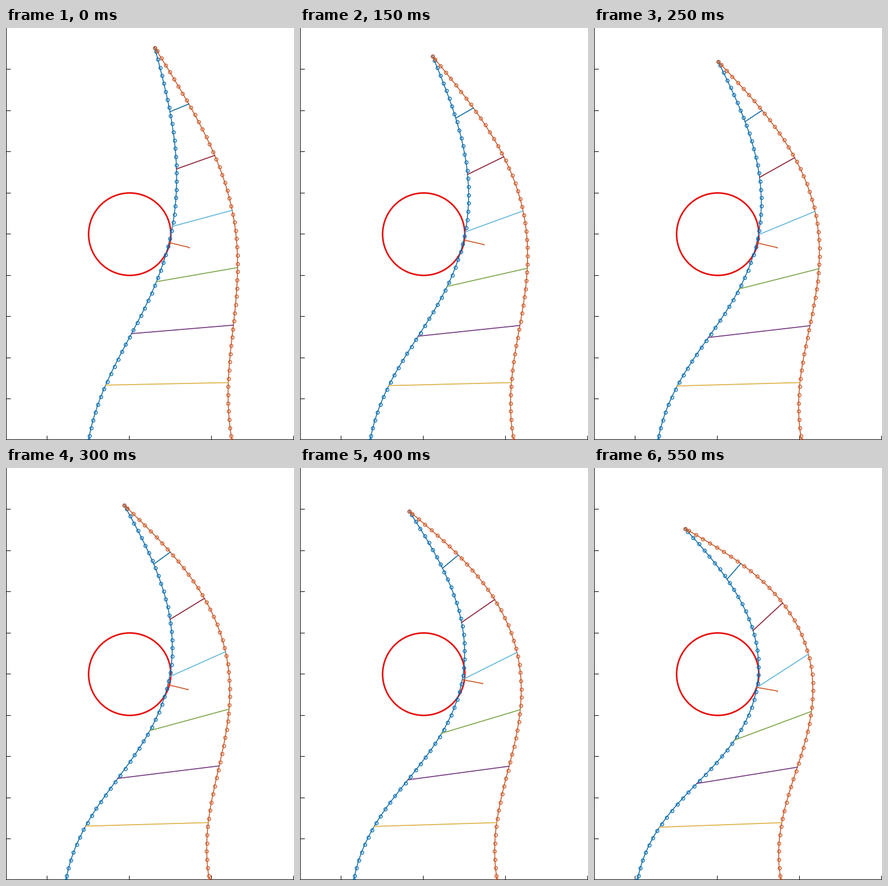
A matplotlib script that plays this animation: 480 px wide and 685 px high, repeating every 0.6 s.

```python
import numpy as np
import matplotlib.pyplot as plt
from matplotlib.animation import FuncAnimation
from matplotlib.colors import to_rgb
from matplotlib.patches import Circle

W, H, DPI = 480, 685, 80
PX = 72 / DPI                 # one pixel in points
UNIT = 68.5                   # pixels per axis unit
FLOOR = 684.6
FRAMES = 12
SEGMENTS, SEG = 50, 0.2 * UNIT
GAP = 238.9                   # distance between the two feet
FOOT_LEAN = 10                # degrees, mirrored on the two sides
RUNG_NODES = range(7, 43, 7)

# Bending of each side as amplitudes (degrees) of the cantilever modes
# sin((k - 1/2) pi s): at rest, and what a full load adds
LEFT = np.array([[-7.9, 19.4, 3.2, 0.6], [-10.6, 19.9, 1.9, -1.3]])
RIGHT = np.array([[-8.5, 17.4, 3.8, -0.2], [-12.7, 16.7, 1.3, 0.0]])

S = (np.arange(SEGMENTS) + 0.5) / SEGMENTS
MODES = np.sin(np.outer(np.arange(4) + 0.5, np.pi * S))


def mute(color, amount=0.25):
    """Pull a colour towards the grey of its own brightness."""
    rgb = np.array(to_rgb(color))
    grey = rgb @ [0.299, 0.587, 0.114]
    return tuple(rgb + (grey - rgb) * amount)


BLUE, ORANGE = mute("#0072BD", 0.15), mute("#D95319", 0.15)
RUNG_COLORS = [mute(c) for c in ("#EDB120", "#7E2F8E", "#77AC30",
                                 "#4DBEEE", "#A2142F", "#0072BD")]


def feed(i):
    """Whole steps the feet have moved; the pace is slightly uneven."""
    return int(np.interp(i, [0, 2, 3, 7, 10, 11], [0, 3, 6, 13, 17, 19]))


def beam(shape, load, x, foot):
    rest, added = shape
    bulge = 2 * load * (1 - load) * np.sin(np.pi * S)
    ang = np.radians(foot + (rest + load * added) @ MODES + bulge)
    steps = SEG * np.column_stack([np.sin(ang), -np.cos(ang)])
    nodes = np.vstack([[0, 0], np.cumsum(steps, axis=0)]) + [x, FLOOR]
    return nodes, ang


def pose(i):
    step = feed(i)
    load = 0.046 * step + 0.126 * (step / 19) ** 12   # slips at the end
    x = 2 * UNIT - 0.05 * UNIT * step
    left, ang = beam(LEFT, load, x, FOOT_LEAN)
    right, _ = beam(RIGHT, load, x + GAP, -FOOT_LEAN)
    # close the fingertip
    right += np.outer(np.linspace(0, 1, SEGMENTS + 1), left[-1] - right[-1])
    touch = 26 + (step + 1) // 7
    tilt = (ang[touch - 1] + ang[touch]) / 2
    start = left[touch]
    end = start + 0.5 * UNIT * np.array([np.cos(tilt), np.sin(tilt)])
    return left, right, start, end


def markers(nodes):
    """Both ends plus the middle of every segment."""
    return np.vstack([nodes[:1], (nodes[:-1] + nodes[1:]) / 2, nodes[-1:]])


fig = plt.figure(figsize=(W / DPI, H / DPI), dpi=DPI, facecolor="white")
ax = fig.add_axes([0, 0, 1, 1])
ax.set_xlim(-0.5, W - 0.5)
ax.set_ylim(H - 0.5, -0.5)
ax.axis("off")


def axis_line(xs, ys):
    ax.plot(xs, ys, color="#1C1C1C", lw=1.1 * PX, snap=False, zorder=1)


axis_line([0, 0], [-1, H])
axis_line([-1, W], [684, 684])
for k in range(1, 10):
    y = round(684.7 - k * UNIT)
    axis_line([0, 7], [y, y])
for x in range(68, W, 137):
    axis_line([x, x], [684, 678])

ax.add_patch(Circle((205.7, 342.3), UNIT, fill=False, ec="#E60C0C",
                    lw=2.6 * PX, zorder=2))


def chain(color, z):
    return ax.plot([], [], "o-", color=color, lw=1.5 * PX, ms=5.4 * PX,
                   mfc="none", mew=1.3 * PX, zorder=z)[0]


def rod(color, z):
    return ax.plot([], [], color=color, lw=1.6 * PX, zorder=z)[0]


left_line, right_line = chain(BLUE, 3), chain(ORANGE, 4)
rungs = [rod(c, 5) for c in RUNG_COLORS]
force = rod(ORANGE, 6)
force_head, = ax.plot([], [], "o", color=ORANGE, ms=2 * PX, mew=0, zorder=6)


def draw(i):
    left, right, start, end = pose(i)
    left_line.set_data(*markers(left).T)
    right_line.set_data(*markers(right).T)
    for line, n in zip(rungs, RUNG_NODES):
        line.set_data(*np.array([left[n], right[n]]).T)
    force.set_data(*np.array([start, end]).T)
    force_head.set_data([end[0]], [end[1]])
    return [left_line, right_line, *rungs, force, force_head]


anim = FuncAnimation(fig, draw, frames=FRAMES, interval=50,
                     repeat=True, repeat_delay=0, blit=False)
plt.show()
```
